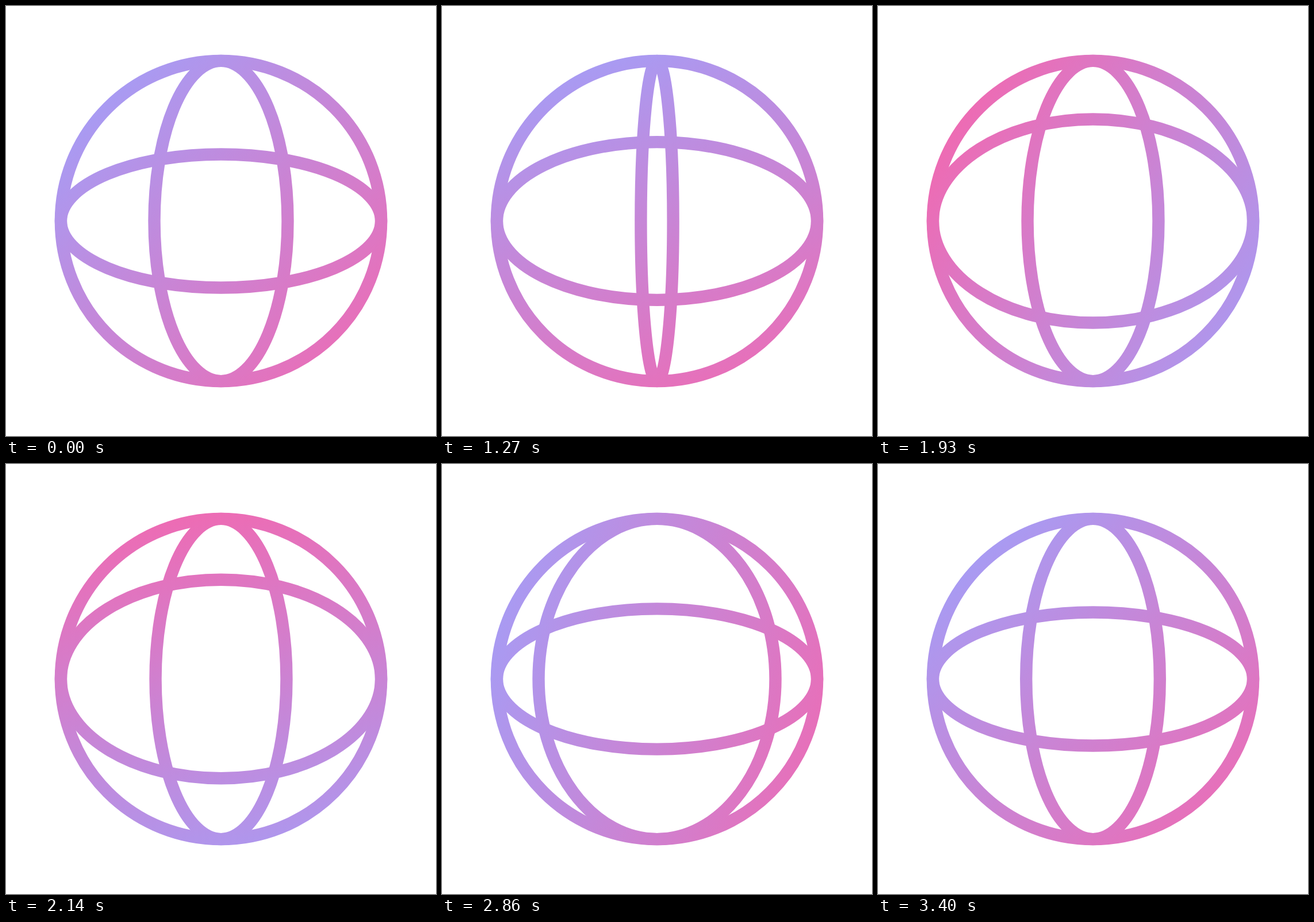
Write an HTML page that moves like this. It is 748 px wide and 748 px high and loops after 3430 ms.

```html
<!DOCTYPE html>
<html lang="en">
<head>
<meta charset="utf-8">
<title>Spinning globe</title>
<style>
  html, body { margin: 0; width: 100%; height: 100%; overflow: hidden; background: #fff; }
  svg { display: block; width: 100vw; height: 100vh; }
</style>
</head>
<body>
<svg viewBox="0 0 748 748">
  <defs>
    <linearGradient id="ink" gradientUnits="userSpaceOnUse" x1="69" y1="399" x2="729" y2="399" gradientTransform="rotate(45 399 399)">
      <stop offset="0" stop-color="#a89bf3"/>
      <stop offset="1" stop-color="#ee6bb3"/>
    </linearGradient>
  </defs>
  <g fill="none" stroke="url(#ink)" stroke-width="21.4">
    <circle cx="374" cy="374" r="278.6"/>
    <ellipse id="meridian" cx="374" cy="374" rx="116" ry="278.6"/>
    <ellipse id="parallel" cx="374" cy="374" rx="278.6" ry="116"/>
  </g>
</svg>
<script>
  const LOOP = 3430, HOLD = 1000, STEP = 30;
  const R = 278.6, REST = 116;
  const ink = document.getElementById('ink');
  const meridian = document.getElementById('meridian');
  const parallel = document.getElementById('parallel');

  // Cubic bezier easing with handles (a, 0) and (b, 1).
  const ease = (a, b) => x => {
    if (x <= 0) return 0;
    if (x >= 1) return 1;
    let lo = 0, hi = 1, s;
    for (let i = 0; i < 30; i++) {
      s = (lo + hi) / 2;
      const at = 3 * a * s * (1 - s) ** 2 + 3 * b * s * s * (1 - s) + s ** 3;
      if (at < x) lo = s; else hi = s;
    }
    return s * s * (3 - 2 * s);
  };

  const smooth = ease(1 / 3, 2 / 3);

  // Each key: time, value, easing towards it.
  const track = keys => t => {
    for (let i = 1; i < keys.length; i++) {
      const [t0, v0] = keys[i - 1], [t1, v1, curve] = keys[i];
      if (t <= t1) return v0 + (v1 - v0) * curve((t - t0) / (t1 - t0));
    }
    return keys[keys.length - 1][1];
  };

  // A negative width is the meridian seen from behind.
  const width = track([[0, REST], [660, -R, smooth], [1410, R, smooth], [2430, REST, ease(1 / 3, 0.6)]]);
  const height = track([[0, REST], [685, 178.2, smooth], [2400, REST, ease(0.65, 0.27)]]);
  const turn = track([[0, 45], [2410, 405, ease(0.24, 0.52)]]);

  function draw(now) {
    const t = Math.max(0, Math.floor((now % LOOP - HOLD) / STEP) * STEP);
    meridian.setAttribute('rx', Math.max(0.1, Math.abs(width(t))));
    parallel.setAttribute('ry', height(t));
    ink.setAttribute('gradientTransform', `rotate(${turn(t)} 399 399)`);
  }

  const start = performance.now();
  function tick() {
    draw(performance.now() - start);
    requestAnimationFrame(tick);
  }
  tick();
</script>
</body>
</html>
```
